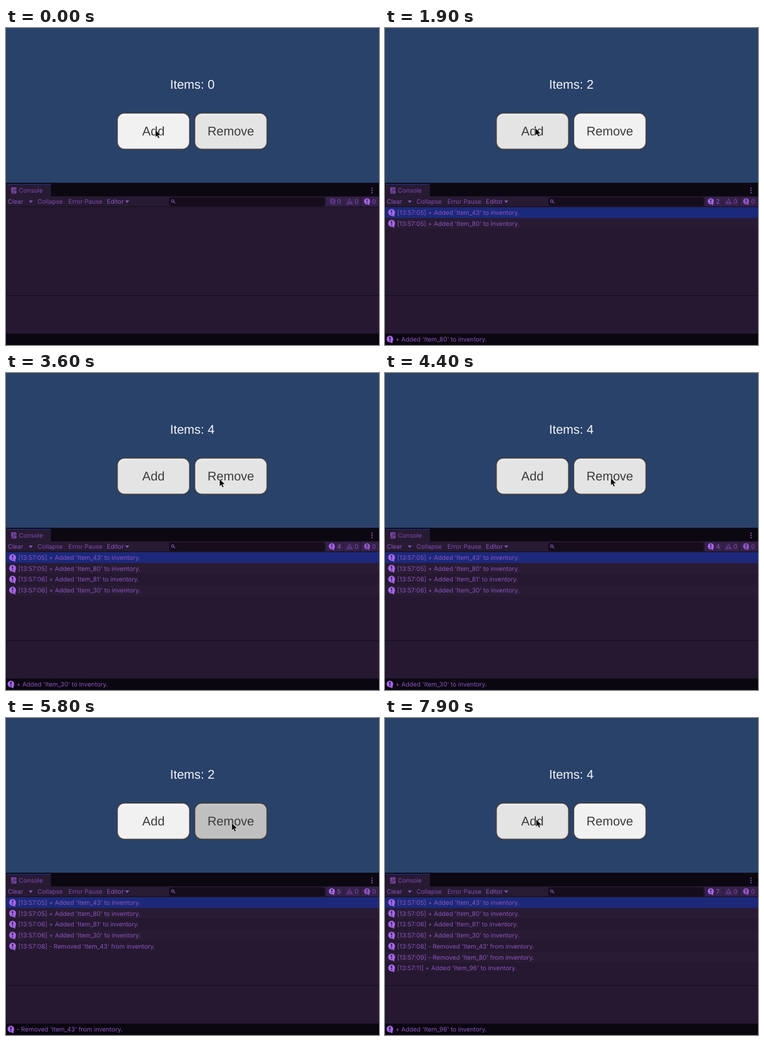
An HTML page with a canvas for the animation above (8000 ms loop, 640 by 543 pixels).

```html
<!DOCTYPE html>
<html lang="en">
<head>
<meta charset="utf-8">
<title>Inventory console</title>
<style>
html, body { margin: 0; width: 100%; height: 100%; overflow: hidden; background: #0b0711; }
canvas { display: block; width: 640px; height: 543px; }
</style>
</head>
<body>
<canvas id="stage" width="640" height="543"></canvas>
<script>
const ctx = document.getElementById('stage').getContext('2d');
ctx.textRendering = 'geometricPrecision';

const LOOP = 8000, STEP = 100, FADE = 150;
const UI = '10.62px Inter, sans-serif';
const GAME = '21.5px "Liberation Sans", Arial, sans-serif';
const NORMAL = 241, HOVER = 228, PRESSED = 192;
const PANEL = '#251830', EDGE = '#150d1d', TEXT = '#8b55bd', LABEL = '#804bae', BRIGHT = '#a565e8';

// [time, value] lists; a value holds until the next one
const counts = [[0, 0], [600, 1], [1600, 2], [2400, 3], [2900, 4], [4900, 3], [5800, 2], [6900, 3], [7800, 4]];
const addStates = [[-900, NORMAL], [250, PRESSED], [600, HOVER], [1350, PRESSED], [1600, HOVER],
  [2050, PRESSED], [2300, HOVER], [2700, PRESSED], [2900, HOVER], [4550, NORMAL],
  [6350, HOVER], [6600, PRESSED], [6900, HOVER], [7450, PRESSED], [7700, HOVER]];
const removeStates = [[-900, HOVER], [250, NORMAL], [3450, HOVER], [4550, PRESSED], [4900, HOVER],
  [5550, PRESSED], [5800, HOVER], [6550, NORMAL]];
const logs = [
  [700, '05', 43, true], [1700, '05', 80, true], [2500, '06', 81, true], [3000, '06', 30, true],
  [5000, '08', 43, false], [5900, '09', 80, false], [7000, '11', 96, true]
];
const pointer = [[0, 256.3, 174.5], [500, 256.3, 174.5], [800, 258, 171.6], [3100, 258, 171.6],
  [3600, 366.5, 181.6], [4200, 387.5, 180], [6000, 387.5, 180], [6500, 259.3, 173.7], [LOOP, 259.3, 173.7]];

const mix = (a, b, k) => a + (b - a) * k;

function indexAt(list, t) {
  let i = 0;
  while (i + 1 < list.length && list[i + 1][0] <= t) i++;
  return i;
}

function shadeAt(states, t) {
  const i = indexAt(states, t);
  const from = states[Math.max(0, i - 1)][1];
  return Math.round(mix(from, states[i][1], Math.min(1, (t - states[i][0]) / FADE)));
}

function pointerAt(t) {
  const i = Math.min(indexAt(pointer, t), pointer.length - 2);
  const [t0, x0, y0] = pointer[i], [t1, x1, y1] = pointer[i + 1];
  const k = (t - t0) / (t1 - t0), ease = k * k * (3 - 2 * k);
  return [mix(x0, x1, ease), mix(y0, y1, ease)];
}

function rect(x, y, w, h, color) {
  ctx.fillStyle = color;
  ctx.fillRect(x, y, w, h);
}

function round(x, y, w, h, r, color) {
  ctx.beginPath();
  ctx.roundRect(x, y, w, h, r);
  ctx.fillStyle = color;
  ctx.fill();
}

function poly(color, ...points) {
  ctx.beginPath();
  points.forEach(([x, y]) => ctx.lineTo(x, y));
  ctx.closePath();
  ctx.fillStyle = color;
  ctx.fill();
}

function text(str, x, y, color, font = UI, align = 'left') {
  ctx.font = font;
  ctx.textAlign = align;
  ctx.fillStyle = color;
  ctx.fillText(str, x, y);
}

function button(label, x, shade) {
  const gray = (d) => { const v = Math.min(255, shade + d); return `rgb(${v},${v},${v})`; };
  round(x - 1, 144.7, 126, 64, 13, '#3a3a40');
  round(x + 0.5, 146.2, 123, 61, 11.7, `rgb(${shade - 62},${shade - 68},${shade - 74})`);
  const fill = ctx.createLinearGradient(0, 147, 0, 207);
  fill.addColorStop(0, gray(10));
  fill.addColorStop(0.06, gray(2));
  fill.addColorStop(0.12, gray(0));
  fill.addColorStop(1, gray(0));
  round(x + 1.2, 146.9, 121.6, 59.4, 11, fill);
  text(label, x + 62, 184, '#3b3b3b', GAME, 'center');
}

function bubble(x, y, r, color, mark) {
  ctx.beginPath();
  ctx.arc(x, y, r, 0, Math.PI * 2);
  ctx.fillStyle = color;
  ctx.fill();
  poly(color, [x, y + r * 0.8], [x + r * 0.9, y + r * 0.3], [x + r * 0.7, y + r * 1.35]);
  rect(x - 0.9, y - r * 0.65, 1.8, r * 0.75, mark);
  rect(x - 0.9, y + r * 0.34, 1.8, 1.7, mark);
}

function downArrow(x, y) {
  poly(TEXT, [x - 3.5, y - 2], [x + 3.5, y - 2], [x, y + 2.2]);
}

function drawGame(t) {
  rect(0, 0, 640, 265, '#29426a');
  text('Items: ' + counts[indexAt(counts, t)][1], 319.7, 104, '#f4f5f7', GAME, 'center');
  button('Add', 191, shadeAt(addStates, t));
  button('Remove', 323.8, shadeAt(removeStates, t));
}

function drawTab() {
  rect(0, 265, 640, 23.5, '#0c0812');
  round(1, 267, 76, 22, [3, 3, 0, 0], '#271a33');
  rect(1, 267, 76, 1, '#1f3590');
  round(9, 273, 9, 10.5, 1, LABEL);
  rect(11, 275.4, 7, 1, '#271a33');
  rect(11, 278, 7, 1, '#271a33');
  rect(9, 280.6, 7, 1, '#271a33');
  text('Console', 22, 282, LABEL);
  for (const y of [273.5, 277.3, 281.1]) rect(627, y, 2, 2, TEXT);
}

function drawToolbar(total) {
  rect(0, 288.5, 640, 17.5, '#271a33');
  rect(0, 305.5, 640, 1, EDGE);
  text('Clear', 3, 301, TEXT);
  downArrow(42.5, 297.5);
  text('Collapse', 54, 301, LABEL);
  text('Error Pause', 107, 301, LABEL);
  text('Editor', 173, 301, TEXT);
  downArrow(208, 297.5);

  const shift = total === 1 ? 2 : 0;
  round(280 + shift, 290, 267 - shift, 15, 4, '#150d1c');
  ctx.strokeStyle = TEXT;
  ctx.lineWidth = 1.1;
  ctx.beginPath();
  ctx.arc(286 + shift, 296.3, 2.1, 0, Math.PI * 2);
  ctx.moveTo(287.6 + shift, 297.9);
  ctx.lineTo(290.4 + shift, 300.4);
  ctx.stroke();

  const badge = '#35214a';
  rect(549 + shift, 289, 30 - shift, 16.5, badge);
  rect(580, 289, 27, 16.5, badge);
  rect(609, 289, 30, 16.5, badge);
  const infoX = total ? 559 + shift : 560.5;
  bubble(infoX, 296.7, 5.2, total ? BRIGHT : '#5b3681', badge);
  text(total, 568 + shift, 301, total ? '#9259c4' : LABEL);
  poly('#5b3681', [583.5, 302], [589.5, 291.3], [595.5, 302]);
  rect(588.7, 295, 1.6, 3.4, badge);
  rect(588.7, 299.3, 1.6, 1.4, badge);
  text('0', 598, 301, LABEL);
  bubble(619.5, 296.7, 5.2, total ? '#8f55c6' : BRIGHT, badge);
  text('0', 628, 301, LABEL);
}

function message([, , id, added]) {
  return added ? `+ Added 'Item_${id}' to inventory.` : `- Removed 'Item_${id}' from inventory.`;
}

function drawConsole(t) {
  const shown = logs.filter((log) => log[0] <= t);
  rect(0, 265, 640, 278, PANEL);
  drawTab();
  drawToolbar(shown.length);
  rect(0, 265, 0.5, 278, EDGE);
  shown.forEach((log, i) => {
    const y = 316 + i * 18.7;
    const back = i === 0 ? '#1c297b' : i % 2 ? '#291b34' : PANEL;
    rect(0.5, y - 9, 639.5, 18.7, back);
    bubble(11.3, y - 0.2, 5.9, BRIGHT, back);
    text(`[13:57:${log[1]}] ${message(log)}`, 21, y + 4, TEXT);
  });
  rect(0, 457.8, 640, 1.2, EDGE);
  rect(0, 523.5, 640, 19.5, '#0b0711');
  if (shown.length) {
    bubble(8.4, 532.8, 5.7, BRIGHT, '#0b0711');
    text(message(shown[shown.length - 1]), 18, 537.3, TEXT);
  }
}

function drawPointer(t) {
  const [x, y] = pointerAt(t);
  ctx.save();
  ctx.translate(x, y);
  poly('#000', [0, 0], [0, 12.6], [2.9, 10], [4.8, 14.4], [7, 13.4], [5.1, 9.2], [9, 9]);
  ctx.strokeStyle = 'rgba(255,255,255,0.75)';
  ctx.lineWidth = 0.7;
  ctx.stroke();
  ctx.restore();
}

const start = performance.now();
function frame() {
  const elapsed = (performance.now() - start) % LOOP;
  const t = Math.floor(elapsed / STEP) * STEP;
  drawGame(t);
  drawConsole(t);
  drawPointer(t);
  requestAnimationFrame(frame);
}
frame();
</script>
</body>
</html>
```
